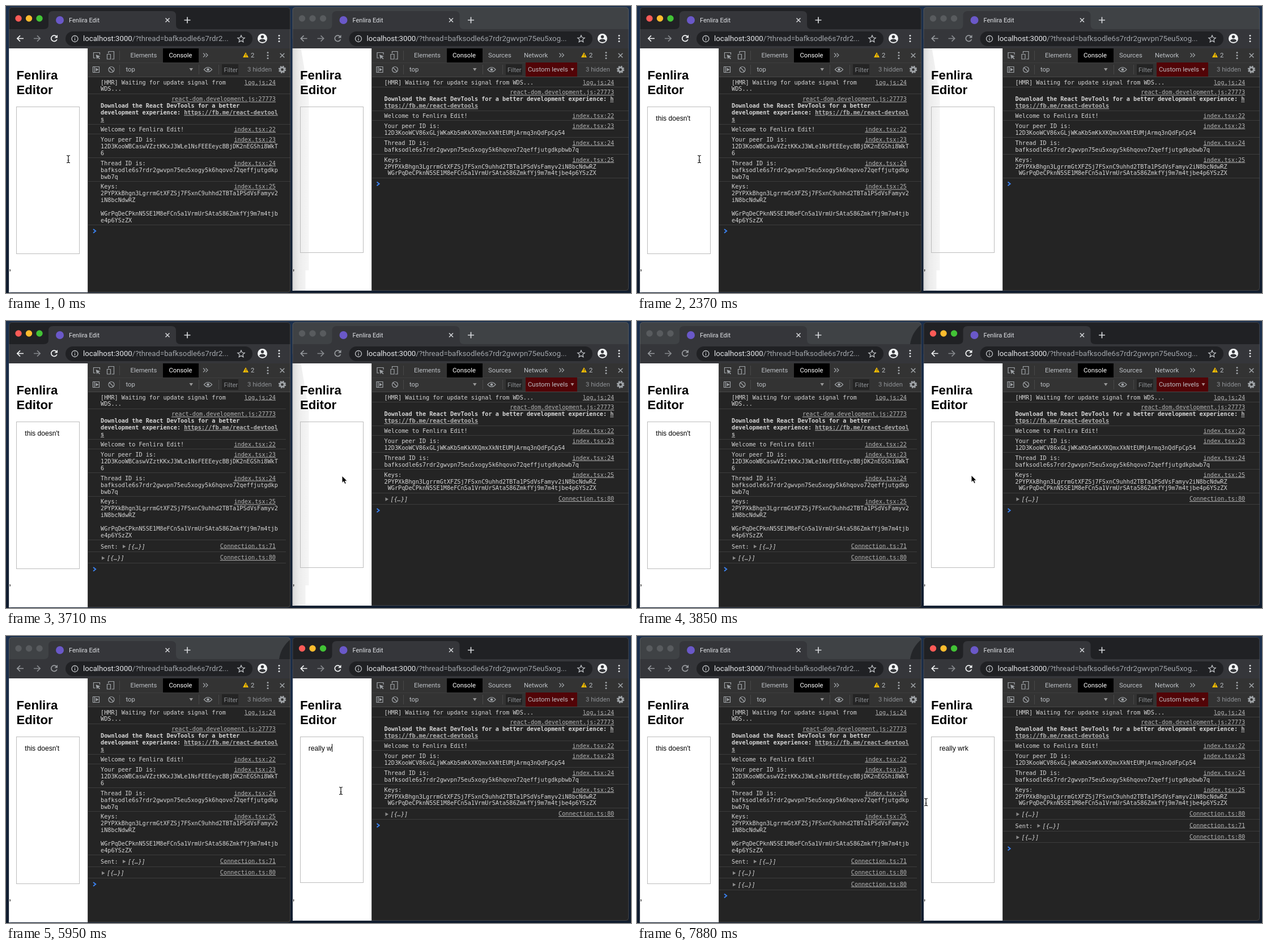
An HTML page that plays this animation: 1103 px wide and 508 px high, repeating every 8000 ms.

```html
<!DOCTYPE html>
<html lang="en">
<head>
<meta charset="utf-8">
<title>Shared editor</title>
<style>
html, body { margin: 0; width: 100%; height: 100%; overflow: hidden; background: #14243c; }
svg { display: block; width: 1103px; height: 508px; }
text { white-space: pre; font: 11.3px Roboto, sans-serif; fill: #bdc1c6; }
.mono { font: 10.2px "DejaVu Sans Mono", monospace; fill: #d6d6d6; }
.link { text-decoration: underline; fill: #b4b4b4; }
.bold { font-weight: bold; }
.obj { font-style: italic; }
.head { font: bold 22.2px "Liberation Sans", sans-serif; fill: #000; }
.typed { font: 12.1px "Liberation Sans", sans-serif; fill: #000; }
.url { font-size: 13.2px; fill: #a2a6ab; }
.ico { fill: none; stroke: #a0a4a8; stroke-width: 1.2; }
</style>
</head>
<body>
<svg id="stage" viewBox="0 0 1103 508"></svg>
<script>
const LOOP = 8000;
const TYPED_X = 33.3;
const CRISP = 'shape-rendering="crispEdges"';
const stage = document.getElementById('stage');
const ruler = document.createElement('canvas').getContext('2d');
ruler.font = '12.1px "Liberation Sans", sans-serif';

// Last entry whose start time has been reached
const at = (t, steps) => steps.filter(s => s[0] <= t).pop();
const within = (t, spans) => spans.some(([a, b]) => t >= a && t < b);

const text = (x, y, s, cls = '', extra = '') => `<text x="${x}" y="${y}" class="${cls}" ${extra}>${s}</text>`;
const rect = (x, y, w, h, fill, extra = CRISP) => `<rect x="${x}" y="${y}" width="${w}" height="${h}" fill="${fill}" ${extra}/>`;
const circle = (x, y, r, fill, extra = '') => `<circle cx="${x}" cy="${y}" r="${r}" fill="${fill}" ${extra}/>`;
const icon = (d, extra = '') => `<path class="ico" d="${d}" ${extra}/>`;
const solid = (d, fill) => `<path d="${d}" fill="${fill}"/>`;
const shift = (dx, body) => `<g transform="translate(${dx} 0)">${body}</g>`;
const dots = (x, y, fill) => [-5, 0, 5].map(d => circle(x, y + d, 1.5, fill)).join('');
const cross = (x, y, r) => `M${x - r} ${y - r}l${2 * r} ${2 * r}m0 ${-2 * r}l${-2 * r} ${2 * r}`;
const bold = s => `<tspan class="bold">${s}</tspan>`;
const boldLink = s => `<tspan class="bold link">${s}</tspan>`;

const devtoolsUrl = 'https://fb.me/react-devtools';
const thread = 'bafksodle6s7rdr2gwvpn75eu5xogy5k6hqovo72qeffjutgdkpbwb7q';
const key = '2PYPXkBhgn3LgrrmGtXFZSj7FSxnC9uhhd2TBTa1PSdVsFamyv2iN8bcNdwRZ';
const key2 = 'WGrPqDeCPknN5SE1M8eFCn5a1VrmUrSAta586ZmkfYj9m7m4tjbe4p6YSzZX';
const welcome = ['index.tsx:22', 'Welcome to Fenlira Edit!'];
const sent = ['Connection.ts:71', 'Sent:', 39];
const received = ['Connection.ts:80', '', 2];

const left = {
  x: 0, right: 502, bottom: 507, boxBottom: 439, linkX: 476, toolX: 0, barX: 0,
  url: thread.slice(0, 16) + '...',
  rows: [
    ['log.js:24', '[HMR] Waiting for update signal from', 'WDS...'],
    ['react-dom.development.js:27773', '', bold('Download the React DevTools for a better'),
      bold('development experience: ') + boldLink(devtoolsUrl.slice(0, -1)), boldLink('s')],
    welcome,
    ['index.tsx:23', 'Your peer ID is:', '12D3KooWBCaswVZztKKxJ3WLe1NsFEEEeycBBjDK2nEGShi8WkT', '6'],
    ['index.tsx:24', 'Thread ID is:', thread.slice(0, 51), thread.slice(51)],
    ['index.tsx:25', 'Keys:', key.slice(0, 51), key.slice(51), '', key2.slice(0, 51), key2.slice(51)]
  ],
  objects: [sent, received, received],
  count: [[0, 0], [2520, 1], [2670, 2], [6840, 3]],
  typing: [[0, ''], [900, 'th'], [1040, 'this'], [1190, 'this '], [1490, 'this do'],
    [1640, 'this does'], [1790, 'this doesn'], [1930, "this doesn't"]],
  caret: [[450, 2370], [2970, 3420]]
};

const right = {
  x: 500.5, right: 598.5, bottom: 504, boxBottom: 437, linkX: 572.7, toolX: 96.5, barX: 99.5,
  url: thread.slice(0, 29) + '...',
  rows: [
    ['log.js:24', '[HMR] Waiting for update signal from WDS...'],
    ['react-dom.development.js:27773', '',
      bold('Download the React DevTools for a better development experience: ') + boldLink('h'), boldLink(devtoolsUrl.slice(1))],
    welcome,
    ['index.tsx:23', 'Your peer ID is:', '12D3KooWCV86xGLjWKaKb5mKkXKQmxXkNtEUMjArmq3nQdFpCp54'],
    ['index.tsx:24', 'Thread ID is:', thread],
    ['index.tsx:25', 'Keys:', key, ' ' + key2]
  ],
  objects: [received, sent, received],
  count: [[0, 0], [2670, 1], [6690, 2], [6990, 3]],
  typing: [[0, ''], [5200, 're'], [5350, 'real'], [5500, 'really'], [5800, 'really '],
    [5950, 'really w'], [6100, 'really wr'], [6250, 'really wrk']],
  caret: [[4600, 6690], [7290, 7740]]
};

// time, x, y, arrow shape
const pointer = [[0, 110, 271, 0], [3270, 135, 271, 0], [3420, 290, 273, 1], [3570, 500, 274, 1],
  [3710, 593, 274, 1], [3850, 590, 273, 1], [4600, 591, 274, 0], [7740, 560, 282, 0], [7880, 510, 294, 0]];

function browserBar(w, active) {
  const lights = active ? ['#fc5b57', '#fdbc2e', '#42c336'] : Array(3).fill('#585b5e');
  const nav = active ? '#f1f3f4' : '#96999d';
  const width = w.right - 5;
  const worn = w === left && !active ? solid('M502 6Q485 20 482 41H502Z', '#242629') : '';
  return rect(5, 2, width, 60, active ? '#202124' : '#3f4245', 'rx="5"') + worn +
    solid('M67 41Q75 41 75 33V17Q75 9 83 9H292Q300 9 300 17V33Q300 41 308 41Z', '#35363a') +
    rect(5, 41, width, 34, '#35363a') +
    lights.map((c, i) => circle(22 + i * 18.5, 22, 5.7, c)).join('') +
    circle(95, 25, 7, '#6a58c8') +
    text(111, 29, 'Fenlira Edit', '', 'style="font-size:11px;fill:#dfe1e5"') +
    icon(cross(285, 25, 3.5), 'style="stroke:#d5d7da;stroke-width:1.5"') +
    icon('M314.5 25h11M320 19.5v11', 'style="stroke:#d5d7da;stroke-width:1.7"') +
    icon('M31 57.5H20m5-5.2l-5.2 5.2 5.2 5.2', `style="stroke:${nav};stroke-width:1.7"`) +
    icon('M49 57.5h11m-5-5.2l5.2 5.2-5.2 5.2', 'style="stroke:#85888c;stroke-width:1.7"') +
    icon('M89 54a5.2 5.2 0 1 0 .9 5', `style="stroke:${nav};stroke-width:1.7"`) + solid('M91 51v5.5h-5.5z', nav) +
    rect(105, 45, 330 + w.barX, 26, '#202124', 'rx="13"') +
    circle(121.5, 58, 5.5, 'none', 'stroke="#c4c7ca" stroke-width="1.3"') +
    icon('M121.5 57v4m0-6.3v1.4', 'style="stroke:#c4c7ca"') +
    text(136, 62.3, `<tspan fill="#e8eaed">localhost:3000</tspan>/?thread=${w.url}`, 'url') +
    shift(w.barX,
      icon('M415 52l1.8 4 4.4.5-3.3 2.9.9 4.4-3.8-2.3-3.8 2.3.9-4.4-3.3-2.9 4.4-.5z', 'style="stroke:#c9ccd0"') +
      circle(452.5, 57.5, 8.5, '#f1f3f4') + circle(452.5, 54.5, 2.7, '#35363a') +
      solid('M447 62q0-3.5 5.5-3.5t5.5 3.5q-5.5 4-11 0z', '#35363a') + dots(482, 57.5, '#dfe1e5'));
}

function page(w, t, active) {
  const value = at(t, w.typing)[1];
  const caretX = Math.round(TYPED_X + ruler.measureText(value).width);
  const smear = w === right && !active ? solid('M5 75H20Q26 110 34 160V468H28V504H5Z', 'url(#smear)') : '';
  return rect(5, 75, 140, w.bottom - 75, '#fff') + smear +
    text(18.5, 129.7, 'Fenlira', 'head') + text(18.5, 155.7, 'Editor', 'head') +
    rect(18.5, 178.5, 111, w.boxBottom - 179, 'none', `stroke="#bcbcbc" ${CRISP}`) +
    text(TYPED_X, 202.5, value, 'typed') + text(5, 468, ',', 'typed', 'style="font-size:15px"') +
    (within(t, w.caret) ? rect(caretX, 191, 1, 14, '#000') : '');
}

function toolbars(w) {
  const wide = w === right;
  return rect(144, 75, w.right - 144, 50, '#333') +
    rect(144, 100, w.right - 144, 1, '#3e3e3e') + rect(144, 125, w.right - 144, 1, '#484848') +
    icon('M158 92h-3.5V82.5h11V86') + solid('M158.5 86l8 3-3.2 1.2 2.7 3-1.3 1.1-2.7-3-1.6 3z', '#a0a4a8') +
    icon('M181 84v-3.5h9.5v13.5h-4M178.5 85.5h6v8.5h-6z') +
    text(219.5, 91, 'Elements') + rect(277, 75, 63, 25, '#000') + text(287.5, 91, 'Console', '', 'style="fill:#fff"') +
    (wide ? text(350.5, 91, 'Sources') + text(413.5, 91, 'Network') : '') +
    shift(wide ? 128 : 0, icon('M348 83.5l3.5 3.5-3.5 3.5m4.5-7l3.5 3.5-3.5 3.5')) +
    icon('M153.5 107.5h11v10h-11zM156.5 108v9') + solid('M158.5 109.5l5 3-5 3z', '#a0a4a8') +
    circle(186, 112.5, 5, 'none', 'class="ico"') + icon('M182.5 109l7 7') +
    [200, 340, 375].map(x => rect(x, 104, 1, 17, '#484848')).join('') + rect(200, 79, 1, 17, '#484848') +
    text(211.5, 116, 'top') + solid('M323.5 110h6.5l-3.25 5z', '#9a9a9a') +
    icon('M349.5 112.5q7-8 14 0q-7 8-14 0z') + circle(356.5, 112.5, 2.3, '#a0a4a8') +
    rect(381, 103, 29, 19, '#242424') + text(384.5, 116.5, 'Filter', '', 'style="fill:#8d9094;font-size:11px"') +
    (wide ? rect(416, 100, 91, 25, '#520407') + text(420.5, 116, 'Custom levels') + solid('M496 110h6l-3 5z', '#a98b8c') : '') +
    shift(w.toolX,
      solid('M423 82l5 9h-10z', '#f5bd00') + rect(422.5, 85, 1, 3, '#333') + rect(422.5, 89, 1, 1, '#333') +
      text(432, 91, '2') + dots(462, 87.5, '#a0a4a8') +
      icon(cross(487.5, 87.5, 3.8), 'style="stroke-width:1.5"') +
      text(426, 116, '3 hidden', '', 'style="fill:#8d9094"') +
      circle(487.5, 112.5, 3.8, 'none', 'stroke="#a0a4a8" stroke-width="3"') +
      circle(487.5, 112.5, 5.7, 'none', 'stroke="#a0a4a8" stroke-width="2" stroke-dasharray="2.4 2.08"'));
}

function consoleLog(w, t) {
  const count = at(t, w.count)[1];
  const lineEnd = w === left && count ? 494 : w.right;
  let top = 126, out = '';
  const link = (s, y) => text(w.linkX, y, s, 'mono link', 'text-anchor="end"');
  const endRow = height => {
    top += height;
    out += rect(145, Math.round(top) - 1, lineEnd - 145, 1, '#3c3c3c');
  };
  for (const [file, ...lines] of w.rows) {
    out += link(file, top + 12.5) +
      lines.map((s, i) => s && text(167, top + 12.5 + i * 11.95, s, 'mono')).join('');
    endRow(lines.length * 11.95 + 5.9);
  }
  for (const [file, label, dx] of w.objects.slice(0, count)) {
    out += link(file, top + 13.2) + text(167, top + 14.2, label, 'mono') +
      solid(`M${167 + dx} ${top + 7.5}l5.5 3.2-5.5 3.2z`, '#8a8a8a') +
      text(176 + dx, top + 14.2, '[{…}]', 'mono obj');
    endRow(20.5);
  }
  return out + icon(`M154 ${top + 6.6}l4.2 3.3-4.2 3.3`, 'style="stroke:#3b82f0;stroke-width:1.9"');
}

function browser(w, t, active) {
  return shift(w.x, browserBar(w, active) + page(w, t, active) +
    rect(144, 75, w.right - 144, w.bottom - 75, '#242424') + toolbars(w) + consoleLog(w, t) +
    rect(144, 75, 1, w.bottom - 75, '#4a4a4a') +
    rect(5.5, 2.5, w.right - 6, w.bottom - 3, 'none', 'rx="5" stroke="#85898f" stroke-opacity=".3"'));
}

function cursor(t) {
  const [, x, y, arrow] = at(t, pointer);
  const beam = 'M-3-6.5Q0-6.5 0-4.5Q0-6.5 3-6.5M0-5V5M-3 6.5Q0 6.5 0 4.5Q0 6.5 3 6.5M-1.5 2h3';
  const shape = arrow
    ? '<path d="M0 0V12.5L2.9 9.9 5 14.5 7.3 13.5 5.3 9.2H9.2Z" fill="#000" stroke="#fff"/>'
    : `<g fill="none"><path d="${beam}" stroke="#fff" stroke-width="2.6"/><path d="${beam}" stroke="#111" stroke-width="1.2"/></g>`;
  return `<g transform="translate(${x} ${y})">${shape}</g>`;
}

const defs = `<defs>
  <linearGradient id="desk" x2="0" y2="1"><stop stop-color="#1b2f4c"/><stop offset="1" stop-color="#101c2e"/></linearGradient>
  <linearGradient id="smear"><stop stop-color="#d9d9d9"/><stop offset=".4" stop-color="#ececec"/><stop offset="1" stop-color="#f6f6f6"/></linearGradient>
</defs>`;

let shown = '';
function frame() {
  const t = performance.now() % LOOP;
  const rightActive = t >= 3850;
  const picture = defs + rect(0, 0, 1103, 508, 'url(#desk)') +
    browser(left, t, !rightActive) + browser(right, t, rightActive) + cursor(t);
  if (picture !== shown) stage.innerHTML = shown = picture;
  requestAnimationFrame(frame);
}
frame();
</script>
</body>
</html>
```
